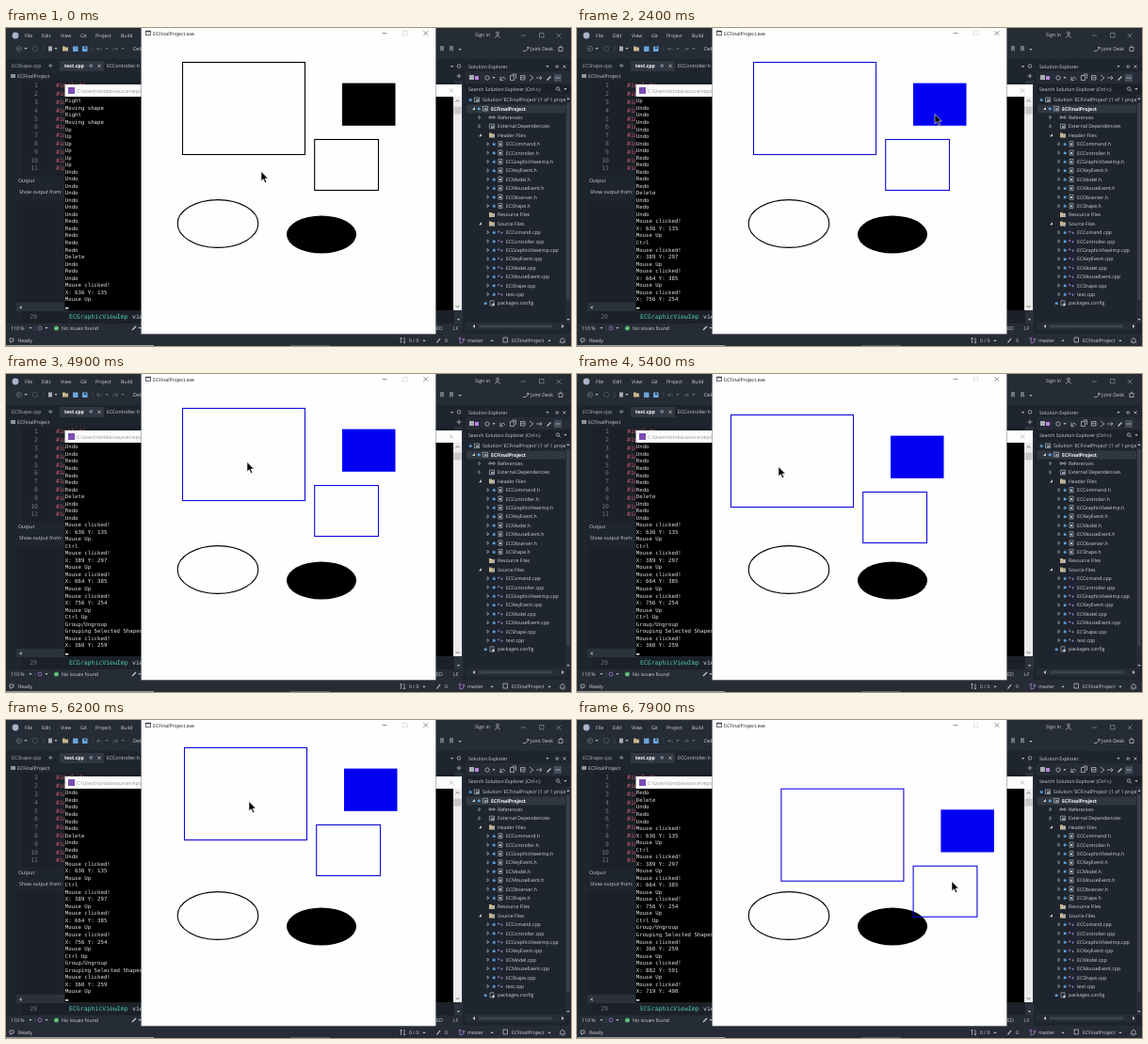
An HTML page for the animation above (8000 ms loop, 600 by 338 pixels).

```html
<!DOCTYPE html>
<html lang="en">
<head>
<meta charset="utf-8">
<title>Shape editor</title>
<style>
  html, body { margin: 0; width: 100%; height: 100%; overflow: hidden; background: #1f252e; }
  svg { display: block; width: 100vw; height: 100vh; }
  text { font: 5.2px "Open Sans", "Noto Sans", sans-serif; fill: #d4d6da; text-rendering: geometricPrecision; white-space: pre; }
  .mono { font: 5.7px "DejaVu Sans Mono", "Noto Sans Mono", monospace; }
  .code { font: 6.5px "DejaVu Sans Mono", "Noto Sans Mono", monospace; }
</style>
</head>
<body>
<svg id="stage" viewBox="0 0 600 338" preserveAspectRatio="none"></svg>
<script>
const LOOP = 8000, STEP = 100, ROWS = 29, PITCH = 7.53;
const BAR = "#262c36", PANEL = "#1f252e", EDITOR = "#1c2129", RAISED = "#2b323c", ICON = "#c4c8ce", DIM = "#6c737d";
const stage = document.getElementById("stage");

// Markup helpers
const box = (x, y, w, h, fill, more = "") =>
  `<rect x="${x}" y="${y}" width="${w}" height="${h}" fill="${fill}" ${more}/>`;
const label = (x, y, s, more = "") => `<text x="${x}" y="${y}" ${more}>${s}</text>`;
const line = (d, color = ICON, w = 0.7) =>
  `<path d="${d}" fill="none" stroke="${color}" stroke-width="${w}"/>`;
const solid = (d, color) => `<path d="${d}" fill="${color}"/>`;
const dot = (x, y, r, color) => `<circle cx="${x}" cy="${y}" r="${r}" fill="${color}"/>`;
const ring = (x, y, r, color = ICON) =>
  `<circle cx="${x}" cy="${y}" r="${r}" fill="none" stroke="${color}" stroke-width=".7"/>`;
const cross = (x, y, r, color, w) =>
  line(`M${x - r} ${y - r}l${2 * r} ${2 * r}m0 ${-2 * r}l${-2 * r} ${2 * r}`, color, w);
const down = (x, y, color = "#b4b9c0") => solid(`M${x - 1.6} ${y - 1}h3.2l-1.6 2z`, color);
const up = (x, y, color = "#b4b9c0") => solid(`M${x - 1.6} ${y + 1}h3.2l-1.6 -2z`, color);
const folder = (x, y, color = "#c9b68c") => solid(`M${x - 3} ${y - 2.4}h2.4l.8 1h2.8v4h-6z`, color);
const pin = (x, y) => line(`M${x - 2} ${y}h1.6m0 -1.6v3.2m0 -.6h2v-2h-2`, "#b4b9c0", .6);

function chrome() {
  const menu = [[20, "File"], [38, "Edit"], [58, "View"], [79, "Git"], [95, "Project"], [122, "Build"]];
  return box(0, 0, 600, 338, PANEL) + box(0, 0, 600, 33, BAR) +
    dot(10, 8, 3.4, "#aab4ca") + menu.map(([x, s]) => label(x, 10, s)).join("") +
    label(498, 9, "Sign in") + ring(522, 5.6, 1.4) + line("M519.5 10.5q2.5 -5 5 0") +
    line("M547 8h5", "#8a9098") + line("M566.5 5.5h4.5v4.5h-4.5z", "#8a9098") + cross(587, 8, 2.3, "#8a9098", .7) +
    ring(14, 22, 2.7, DIM) + line("M15.5 22h-3m1 -1l-1 1l1 1", DIM) + down(21, 22) +
    ring(31, 22, 2.7, "#565d67") + line("M40 19v6", "#454c56") +
    box(45, 19.5, 4, 5, "#a8adb4") + down(53, 22) + folder(63, 22) +
    box(71, 19.5, 5.5, 5.5, "#6aa5dc") + box(81, 19.5, 5.5, 5.5, "#6aa5dc") + box(83, 20.5, 2, 1.5, BAR) +
    line("M92 19v6", "#454c56") + line("M102 24q-4 -5 -5 -1m0 -2v2h2", DIM) + down(107, 22, DIM) +
    line("M113 24q4 -5 5 -1m0 -2v2h-2", DIM) + down(124, 22, DIM) + label(135, 24, "Debug") +
    solid("M461 19h4v6l-2 -1.6l-2 1.6z", DIM) + solid("M471 19h4v6l-2 -1.6l-2 1.6z", DIM) + down(482, 23) +
    line("M549 24.5h3l3 -4m-2 0h2v2") + label(557, 24, "Joint Desk") +
    line("M587 24.5v-4h4v4zm2 -4v-2");
}

function editor() {
  let s = label(6, 42, "ECShape.cpp", 'style="fill:#b0b5bc"') + pin(47, 40) +
    box(57, 35, 47, 11, "#303742") +
    label(62, 42, "test.cpp", 'style="font-weight:700;fill:#fff"') +
    pin(90, 40) + cross(99, 40.3, 1.6, "#ddd") + label(107, 42, "ECController.h") +
    box(0, 46, 485, 10, PANEL) + box(5, 49, 5, 4, "#8d949e") + label(12, 53, "ECFinalProject") +
    box(0, 56, 485, 258, EDITOR) + box(0, 56, 17, 258, PANEL);
  for (let i = 0; i < 11; i++) {
    const y = 63.4 + i * 8.79;
    s += label(34, y, i + 1, 'class="code" text-anchor="end" style="fill:#6f7782"') +
      label(53, y, "#include", 'class="code" style="fill:#c8586e"');
  }
  return s + label(33, 309, 29, 'class="code" text-anchor="end" style="fill:#6f7782"') +
    label(67, 309, "ECGraphicViewImp", 'class="code" style="fill:#4ec9b0"') +
    label(134, 309, "view", 'class="code"') +
    box(10, 157, 60, 144, PANEL) + label(13, 164, "Output") + label(14, 176, "Show output from:") +
    box(11, 183, 55, 108, EDITOR) + box(11, 292, 55, 9, RAISED) + solid("M16.5 295v4l-2.5 -2z", "#a8adb4") +
    box(0, 314, 485, 11, BAR) + label(5, 321, "110 %") + down(26, 319) + line("M31 316v6", "#454c56") +
    ring(36, 319, 2, "#b884dc") + down(43, 319) + dot(53.5, 319, 2.6, "#45a862") + line("M52.2 319l1 1l1.6 -2", "#fff", .6) +
    label(59, 321, "No issues found") + line("M134 321l4 -4", ICON, 1.2) + down(142, 319) +
    label(448, 321, "MIXED") + label(475, 321, "LF") +
    box(476, 56, 9, 258, RAISED) + down(480.5, 310) +
    down(473.5, 41) + ring(481, 40.5, 1.8) + line("M478.5 51h5m-2.5 -2.5v5");
}

function explorer() {
  const heads = ["Command", "Controller", "GraphicViewImp", "KeyEvent", "Model", "MouseEvent", "Observer", "Shape"];
  const units = ["Comand", "Controller", "GraphicViewImp", "KeyEvent", "Model", "MouseEvent", "Shape"];
  const rows = [
    [506, "Solution 'ECFinalProject' (1 of 1 project)", "sln"], [515, "ECFinalProject", "prj"],
    [522, "References", "ref"], [522, "External Dependencies", "dir"], [522, "Header Files", "open"],
    ...heads.map(n => [531, `EC${n}.h`, "h"]),
    [522, "Resource Files", "leaf"], [522, "Source Files", "open"],
    ...units.map(n => [531, `EC${n}.cpp`, "cpp"]), [531, "test.cpp", "cpp"],
    [522, "packages.config", "cfg"]];
  let s = box(488, 35, 112, 279, PANEL) +
    label(491, 43, "Solution Explorer") + down(575, 41) + pin(585, 41) + cross(593, 41, 1.6, ICON) +
    box(488, 46, 112, 13, BAR) + box(492, 50, 5, 5, "#a8adb4") + box(498, 51, 4, 4, "#b884dc") +
    ring(511, 53, 2.2) + down(518, 53) + line("M525 55.5q3 -6 5 -1m-5 -3v4h3") +
    line("M535.5 50.5h4v5h-4zm2 -1.5h4v5") + line("M546.5 50.5h4.5v4.5h-4.5zm0 2.2h4.5") + line("M556 50l4 3l-4 3") +
    line("M563 53h6m-2 -2l2 2l-2 2") + line("M574.5 55.5l4 -4", ICON, 1.3) +
    box(582, 49, 8, 8, "#454d5a") + line("M583.5 53h5") +
    box(489, 60, 110, 10, EDITOR) + label(491, 67, "Search Solution Explorer (Ctrl+;)") +
    ring(586, 64.5, 1.7) + line("M587.3 65.8l1.7 1.7") + down(594, 65) +
    box(489, 81.5, 105, 9, "#303741");
  rows.forEach(([x, name, kind], i) => {
    const y = 76.2 + i * 9.4, ix = x - 6;
    const shut = ["ref", "dir", "h", "cpp"].includes(kind), open = ["prj", "open"].includes(kind);
    if (shut) s += line(`M${x - 20} ${y - 1.7}l2 1.7l-2 1.7z`, "#b4b9c0", .6);
    if (open) s += solid(`M${x - 17} ${y + 1.5}h-3l3 -3z`, "#d0d3d8");
    if (["h", "cpp", "cfg", "prj", "sln"].includes(kind)) {
      s += box(x - 14.2, y - .6, 2.8, 2.2, "#5ba0dc") + line(`M${x - 13.7} ${y - .5}q.9 -2.2 1.8 0`, "#5ba0dc", .5);
    }
    if (["open", "leaf"].includes(kind)) s += folder(ix, y) + box(ix, y, 3, 2.5, "#a8adb4");
    else if (kind == "cpp") s += line(`M${ix - 3} ${y - .6}h2.4m-1.2 -1.2v2.4M${ix + .3} ${y + .6}h2.4m-1.2 -1.2v2.4`, "#a884d0");
    else if (kind == "h") s += line(`M${ix - 2} ${y - 2.6}h4v5.2h-4z`, ICON, .6) + box(ix - 1, y - .7, 2, 2, ICON);
    else if (kind == "ref") s += line(`M${ix - 3} ${y - 1}h2v2h-2zm2 1h2m0 -1h2v2h-2z`, ICON, .6);
    else if (kind == "cfg") s += line(`M${ix - 2} ${y - 2.6}h4v5.2h-4z`, ICON, .6) + dot(ix + 1.5, y + 1.5, 1.4, ICON);
    else s += line(`M${ix - 2.6} ${y - 2.2}h5.2v4.6h-5.2z`, "#b4b9c0") + box(ix - 1, y - .6, 3, 2.6, "#8d949e");
    s += label(x, y + 1.9, name, kind == "prj" ? 'style="font-weight:700;fill:#fff"' : "");
  });
  return s + box(594, 71, 6, 243, BAR) + up(597, 75) + box(595.5, 80, 3, 209, "#3c434d") + down(597, 310) +
    box(488, 313, 106, 8, BAR) + box(502, 315.5, 78, 3, "#3c434d") +
    solid("M498 315v4l-2.5 -2z", ICON) + solid("M590 315v4l2.5 -2z", ICON);
}

function status() {
  return box(0, 325, 600, 13, BAR) + box(0, 337, 157, 1, "#969ba2") + box(302, 337, 42, 1, "#565d67") +
    line("M4 330h4v3h-2l-1 1.5v-1.5h-1z") + label(13, 334, "Ready") +
    line("M419.5 335v-6m-1.2 1.3l1.2 -1.3l1.2 1.3M423 329v6m-1.2 -1.3l1.2 1.3l1.2 -1.3") + label(428, 334, "0 / 0") + up(444, 332) +
    line("M457.5 334.5l3.5 -4.5", ICON, 1.2) + label(466, 334, "0") +
    ring(482, 330, 1, "#b884dc") + ring(486, 331, 1, "#b884dc") + line("M482 331v4q4 0 4 -3", "#b884dc") +
    label(490, 334, "master") + up(516, 332) + line("M528 329h4.5v5h-4.5z", "#b4b9c0", .8) +
    label(537, 334, "ECFinalProject") + up(577, 332) + line("M588 334h6l-1 -1.2v-2q-2 -3 -4 0v2zm2.3 1.2h1.4");
}

function consoleWindow() {
  let rows = "";
  for (let i = 0; i < ROWS; i++) rows += label(62.8, (79.4 + i * PITCH).toFixed(2), "", 'class="mono log" style="fill:#e4e4e4"');
  return box(62.5, 60, 421.5, 240, "#000") + box(62.5, 60, 421.5, 13, "#fdfdfd") +
    box(66, 63, 7, 7, "#7a4cb4") + label(75, 68.6, "C:\\Users\\lomba\\source\\repos\\ECFinalProject", 'style="fill:#8c8c94"') +
    cross(473, 66.5, 2, "#999", .6) +
    box(475, 73, 9, 227, "#ececec") + line("M477.5 78.5l2 -2l2 2M477.5 295l2 2l2 -2", "#555", .8) +
    box(475.5, 83.5, 8, 8, "#c8c8c8") + rows + box(63, 297, 3.4, 1.6, "#e4e4e4");
}

function appWindow() {
  const outline = 'class="shape" stroke-width="1.1"';
  return box(143.6, -1, 312.8, 326.2, "#fefefe", 'stroke="#74757e" stroke-width=".5"') +
    box(148, 2.8, 6, 5, "#3d3f48") + box(148.7, 4.2, 4.6, 2.9, "#e8e8ee") +
    label(156, 7.6, "ECFinalProject.exe", 'style="fill:#18181c"') +
    line("M399.5 5.5h5", "#555", .6) + line("M421.5 3.3h4.5v4.5h-4.5z", "#cfcfcf", .6) + cross(445.8, 5.5, 2.3, "#444", .6) +
    '<ellipse cx="225" cy="208" rx="42.8" ry="25.4" fill="none" stroke="#000" stroke-width="1.1"/>' +
    '<ellipse cx="335" cy="219.5" rx="37" ry="20"/>' +
    '<g id="group">' + box(187.5, 36.5, 130, 98, "none", outline) +
    box(327.7, 118.5, 67.8, 54, "none", outline) +
    box(357, 58.6, 56.5, 45.2, "#000", 'class="shape"') + "</g>" +
    '<path id="pointer" d="M0 -.5v10.2l2.3 -2.1l1.8 4l1.7 -.8l-1.8 -3.8h3.3z" fill="#000" stroke="#fff" stroke-width=".6"/>';
}

stage.innerHTML = chrome() + editor() + explorer() + status() + consoleWindow() + appWindow();

const logRows = [...stage.querySelectorAll(".log")];
const shapes = [...stage.querySelectorAll(".shape")];
const group = document.getElementById("group");
const pointer = document.getElementById("pointer");

// Console output: start-up history, then timed lines
const click = (x, y) => ["Mouse clicked!", `X: ${x} Y: ${y}`];
const times = (n, s) => Array(n).fill(s);
const history = ["Right", "Moving shape", "Right", "Moving shape", ...times(6, "Up"), ...times(7, "Undo"),
  ...times(5, "Redo"), "Delete", "Undo", "Redo", "Undo", ...click(636, 135), "Mouse Up"];
const events = [
  [700, "Ctrl"], [1400, ...click(389, 297)], [1500, "Mouse Up"], [1900, ...click(664, 385)], [2000, "Mouse Up"],
  [2300, ...click(756, 254)], [2500, "Mouse Up"], [2700, "Ctrl Up"],
  [3000, "Group/Ungroup", "Grouping Selected Shapes"], [4700, ...click(360, 259)], [5900, "Mouse Up"],
  [6600, ...click(882, 591)], [6700, "Mouse Up"], [7300, ...click(719, 400)]];

// Pointer track: time, x, y
const track = [[400, 271, 153], [1300, 265, 105], [1500, 265, 105], [1800, 351, 133], [2000, 351, 133],
  [2300, 380, 92], [2500, 380, 92], [3800, 308, 106], [4600, 256, 94], [4900, 256, 94],
  [5000, 264, 78], [5100, 268, 72], [5200, 252, 86], [5300, 232, 101], [5400, 214, 99], [5500, 211, 134],
  [5600, 241, 160], [5700, 271, 139], [5800, 274, 104], [5900, 258, 87], [6200, 258, 87],
  [6600, 420, 197], [6800, 420, 197], [7200, 368, 138], [7400, 368, 138],
  [7500, 345, 148], [7600, 348, 180], [7700, 372, 200], [7800, 395.4, 181.7], [7900, 398, 172]];

function pointerAt(t) {
  const i = track.findIndex(k => k[0] >= t);
  if (i == 0) return track[0].slice(1);
  if (i < 0) return track.at(-1).slice(1);
  const [t0, x0, y0] = track[i - 1], [t1, x1, y1] = track[i];
  const u = (t - t0) / (t1 - t0), e = u * u * (3 - 2 * u);
  return [x0 + (x1 - x0) * e, y0 + (y1 - y0) * e];
}

// Shapes trail the pointer by one step while dragged
function dragged(t, from, to) {
  const [x0, y0] = pointerAt(from);
  const [x, y] = pointerAt(Math.min(to, Math.max(from, t - STEP)));
  return [x - x0, y - y0];
}

const picked = [1400, 1900, 2300];
const selected = (t, i) => (t >= picked[i] && t < 3000) || (t >= 4700 && t < 6600) || t >= 7300;

function draw(ms) {
  const t = Math.floor((ms % LOOP) / STEP) * STEP;
  const lines = history.concat(...events.filter(e => e[0] <= t).map(e => e.slice(1))).slice(-ROWS);
  logRows.forEach((row, i) => { if (row.textContent != lines[i]) row.textContent = lines[i]; });
  shapes.forEach((s, i) => {
    const on = selected(t, i);
    if (i == 2) s.setAttribute("fill", on ? "#0400f4" : "#000");
    else s.setAttribute("stroke", on ? "#1008d8" : "#000");
  });
  const a = dragged(t, 4900, 5900), b = dragged(t, 7400, 7900);
  group.setAttribute("transform", `translate(${a[0] + b[0]} ${a[1] + b[1]})`);
  pointer.setAttribute("transform", `translate(${pointerAt(t).join(" ")})`);
}

const start = performance.now();
function tick() {
  draw(performance.now() - start);
  requestAnimationFrame(tick);
}
tick();
</script>
</body>
</html>
```
